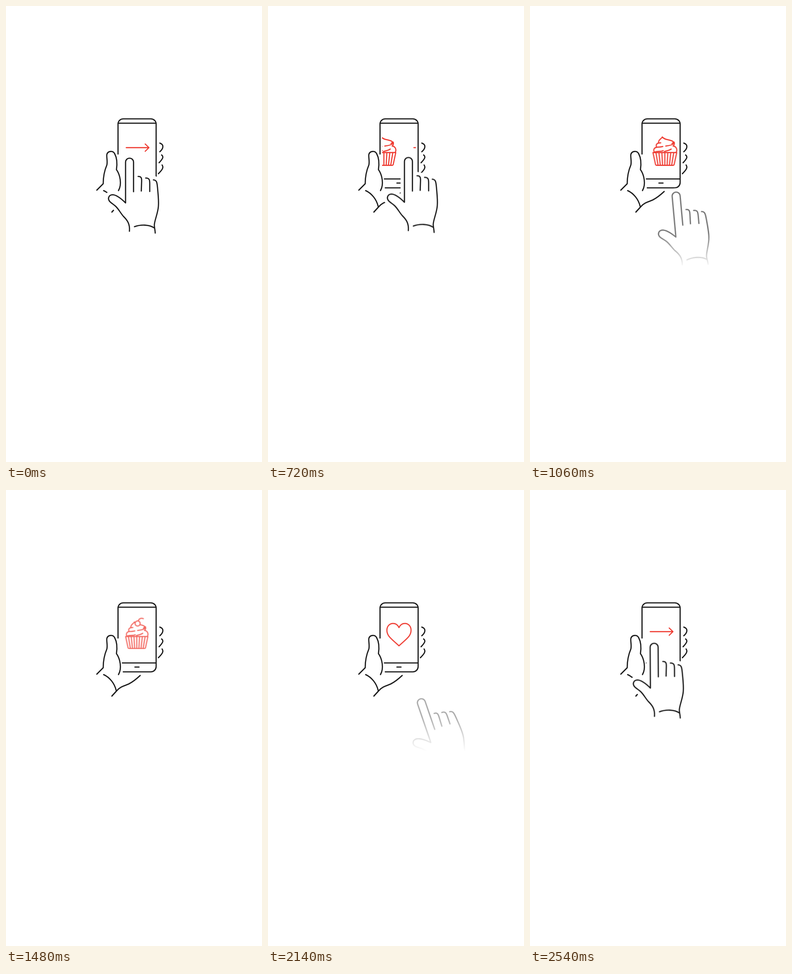
An HTML page without scripts for the animation above (2.56 s loop, 561x998 px).

```html
<!DOCTYPE html>
<html lang="en">
<head>
<meta charset="utf-8">
<title>Swipe on a phone</title>
<style>
html, body { margin: 0; width: 100%; height: 100%; overflow: hidden; background: #fff; }
svg { display: block; width: 561px; height: 998px; }
.ink, .red { fill: none; stroke: #1a1a1a; stroke-width: 2.6; stroke-linecap: round; stroke-linejoin: round; }
.red { stroke: #ee3a30; stroke-width: 2.4; }
.halo { fill: #fff; stroke: #fff; stroke-width: 17; stroke-linejoin: round; stroke-linecap: round; }
.white { fill: #fff; }

.strip, .arrow, .cake, .cherry, .heart, .dot, .hand, .fade { animation: 2560ms linear infinite; }
.strip { animation-name: strip; }
.arrow { animation-name: arrow; }
.cake { animation-name: cake; transform-origin: 0 321px; }
.cherry { animation-name: cherry; }
.heart { animation-name: heart; transform-origin: 287px 316px; }
.dot { animation-name: dot; }
.hand { animation-name: hand; transform-origin: 270.5px 342px; }
.fade { animation-name: fade; }

/* arrow leaves to the right, cupcake follows from the left */
@keyframes strip {
  0%, 20.31% { transform: translateX(0); animation-timing-function: cubic-bezier(.5,0,.8,.7); }
  28.125% { transform: translateX(56px); animation-timing-function: cubic-bezier(.2,.6,.4,1); }
  39.06% { transform: translateX(98.5px); }
  41.41% { transform: translateX(98px); animation-timing-function: ease-in-out; }
  49.22%, 66.4% { transform: translateX(89px); }
  66.41%, 100% { transform: translateX(0); }
}
@keyframes arrow {
  0%, 46% { opacity: 1; transform: none; }
  46.01%, 88.28% { opacity: 0; transform: translateX(-10px); animation-timing-function: ease-out; }
  96.09%, 100% { opacity: 1; transform: none; }
}
@keyframes cake {
  0%, 56.25% { opacity: 1; transform: scale(1); }
  57.81% { opacity: .8; transform: scale(.94); }
  62.5%, 99.9% { opacity: 0; transform: scale(.6); }
  100% { opacity: 1; transform: scale(1); }
}
@keyframes cherry {
  0%, 44.53% { opacity: 0; transform: translateY(-14px); animation-timing-function: ease-in; }
  49.22% { opacity: 1; transform: none; animation-timing-function: ease-out; }
  50.78% { opacity: 1; transform: translateY(-2px); animation-timing-function: ease-in; }
  52.34%, 100% { opacity: 1; transform: none; }
}
@keyframes dot {
  0%, 57% { opacity: 0; transform: translateY(-2px); }
  57.03% { opacity: 1; transform: translateY(-2px); }
  57.81% { opacity: 1; transform: translateY(-6px); animation-timing-function: ease-out; }
  66.41% { opacity: 1; transform: translateY(-36px); }
  71.09%, 100% { opacity: 0; transform: translateY(-40px); }
}
@keyframes heart {
  0%, 60.9% { opacity: 0; transform: scale(0); }
  60.94% { opacity: 1; transform: scale(0); animation-timing-function: ease-out; }
  70.31% { opacity: 1; transform: scale(1.1); animation-timing-function: ease-in-out; }
  75%, 83.59% { opacity: 1; transform: scale(1); }
  89.84%, 100% { opacity: 0; transform: scale(.85); }
}
@keyframes hand {
  0%, 16% { transform: translate(0, 0) rotate(0deg); animation-timing-function: ease-in-out; }
  19.53% { transform: translate(-3.5px, 0) rotate(0deg); animation-timing-function: cubic-bezier(.45,0,.75,.8); }
  28.125% { transform: translate(37px, -1.5px) rotate(0deg); animation-timing-function: cubic-bezier(.4,.1,.75,.7); }
  36.72% { transform: translate(47px, 36px) rotate(-2deg); }
  41.41% { transform: translate(49.5px, 74px) rotate(-5.2deg); }
  45.31% { transform: translate(53px, 108px) rotate(-8deg); }
  48.44%, 60% { transform: translate(57px, 130px) rotate(-12deg); }
  77.3% { transform: translate(71px, 136px) rotate(-22deg); }
  83.59% { transform: translate(65.5px, 124px) rotate(-19deg); animation-timing-function: cubic-bezier(.4,.11,.6,.85); }
  100% { transform: translate(0, 0) rotate(0deg); }
}
@keyframes fade {
  0%, 36% { opacity: 1; }
  41.41% { opacity: .65; }
  47.66%, 77.3% { opacity: 0; }
  83.59% { opacity: .4; }
  92.2%, 100% { opacity: 1; }
}
</style>
</head>
<body>
<svg viewBox="0 0 561 998" xmlns="http://www.w3.org/2000/svg">
  <defs>
    <clipPath id="screen"><rect x="250" y="258" width="73.5" height="119"/></clipPath>
    <linearGradient id="ramp" gradientUnits="userSpaceOnUse" x1="0" y1="497" x2="0" y2="572">
      <stop offset="0" stop-color="#fff"/>
      <stop offset="1" stop-color="#000"/>
    </linearGradient>
    <mask id="low" maskUnits="userSpaceOnUse" x="0" y="0" width="561" height="998">
      <rect width="561" height="998" fill="url(#ramp)"/>
    </mask>
    <path id="half" d="M287 301C284 294.500 279 292 274 292C266 292 260.500 298.500 260.500 307C260.500 320 271 326 287 341"/>
    <path id="ridge" d="M0 321V348"/>
    <path id="spark" class="dot" d="M0 0V-.6"/>
    <path id="edge" d="M279.500 406.500V341.700A8.750 8.750 0 0 0 262 341.700V431C252 421 242 413 233 413C225 414 223 421 226 426C229 431 236 434 241 439C247 445 251 453 257 460C265 468 272 476 270.500 493"/>
    <path id="palm" d="M279 382L289.500 373L306 376.500L323 380.500C331 381 331 388 332 397C333 410 335 424 334 438C333 454 325 470 325 480L327 497L270.500 493L262 431Z"/>
  </defs>

  <g class="ink">
    <path d="M245.500 324V258A11.500 11 0 0 1 257 247H317.500A11.500 11 0 0 1 329 258V386.500A11.500 11.500 0 0 1 317.500 398H257"/>
    <path d="M246 256.500H328.500M255 378.500H328.500M282.500 387.500H291.500"/>
    <path d="M199 403L213 389C213 376 215 362 221 348C223 340 220 331 221 325C223 317 234 316 238 323C243 332 244 345 242 358C250 369 254.500 390 246.500 404"/>
    <path d="M214 404C227 410 238 423 241.500 439M232 451L243 439C251 430 259 429 269 424.500C279 419.500 287 412.500 294 406"/>
    <path d="M337 300C346 303 346 311 337 319M341 326C346 330 344 334 335.500 343M342 348C346 353 343 358 334 367"/>
  </g>

  <g class="red" clip-path="url(#screen)">
    <g class="strip">
      <path class="arrow" d="M263.500 310H313M305 302L313.300 310L305 318"/>
      <g transform="translate(197.500)">
        <g class="cake">
          <path d="M-26 320.700H26L20.500 346.500Q20 348.700 17.800 348.700H-17.800Q-20 348.700-20.500 346.500Z"/>
          <path d="M-19.500 321L-15 348M-13 321L-10 348M-6.500 321L-5 348M6.500 321L5 348M13 321L10 348M19.500 321L15 348"/>
          <use href="#ridge"/>
          <path d="M-23 320C-26 314 -23 309.500 -17 309C-12 308.800 -8 308.500 -4.500 307.500"/>
          <path d="M-18.500 308C-20 302 -16.500 299.500 -9 299.500M-14 299C-13.500 291 -8 292 -5.500 286.500C-2 292 5 292 12 294C18 295.500 21 298 18.500 302C16 304.500 9 305.500 2 306.500"/>
          <path d="M15.500 301C18 300 18.500 298.500 18 297M20.500 298C21.500 302 20 305 18 306.500C25 307 28 314 25 320"/>
          <path d="M-22 319.500C-15 316.500 -9 319.500 -3.500 316.500M-1 318.500C4 317 10 316 14 313"/>
          <g class="cherry">
            <circle class="white" cx="2" cy="290.200" r="6"/>
            <path d="M3.500 284.500C4.500 279.500 9.500 276.500 15.500 279"/>
          </g>
        </g>
      </g>
    </g>
    <g class="heart">
      <use href="#half"/>
      <use href="#half" transform="matrix(-1 0 0 1 574 0)"/>
    </g>
  </g>

  <g class="red" transform="translate(287 316)">
    <use href="#spark"/>
    <use href="#spark" transform="rotate(60)"/>
    <use href="#spark" transform="rotate(120)"/>
    <use href="#spark" transform="rotate(180)"/>
    <use href="#spark" transform="rotate(240)"/>
    <use href="#spark" transform="rotate(300)"/>
  </g>

  <g mask="url(#low)">
    <g class="fade">
      <g class="hand">
        <g class="halo"><use href="#edge"/><use href="#palm"/></g>
        <g class="ink">
          <use href="#edge"/>
          <path d="M289.500 373C296.500 372.500 297.500 377 297.200 384L296.500 405M306 376.500C314 376 315 381 315 388V406"/>
          <path d="M323 380.500C331 381 331 388 332 397C333 410 335 424 334 438C333 454 325 470 325 480C325.500 487 327 492 327 497"/>
          <path d="M281.500 483C295 478 314 478 325.500 486"/>
        </g>
      </g>
    </g>
  </g>
</svg>
</body>
</html>
```
